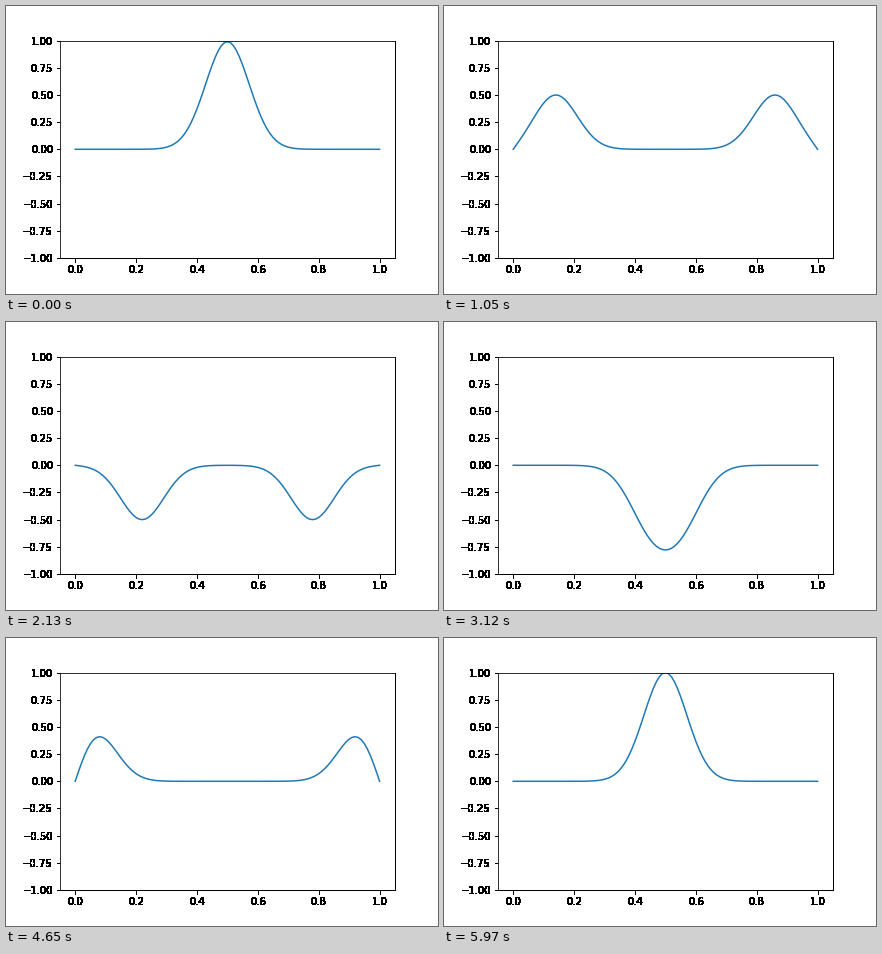
A matplotlib script that plays this animation: 432x288 px, repeating every 6000 ms.

```python
import numpy as np
import matplotlib.pyplot as plt
from matplotlib.animation import FuncAnimation

FRAMES = 200
INTERVAL = 30

plt.rcParams["font.family"] = "DejaVu Sans"
plt.rcParams["font.size"] = 10

x = np.linspace(0, 1, 101)


def pulse(s):
    """Gaussian bump at 0.5, extended oddly with period 2 (fixed ends)."""
    s = (s + 1) % 2 - 1
    return np.sign(s) * np.exp(-100 * (np.abs(s) - 0.5) ** 2)


def wave(travel):
    """Two half-height pulses running in opposite directions."""
    return (pulse(x - travel) + pulse(x + travel)) / 2


def bake_frame(fig):
    """Render the static axes once with hard black edges on the lettering."""
    fig.patch.set_alpha(0)
    fig.canvas.draw()
    rgba = np.array(fig.canvas.buffer_rgba()) / 255
    ink = np.zeros_like(rgba)
    ink[..., 3] = np.where(rgba[..., 3] > 0, 1 - rgba[..., 0], 0)
    fig.patch.set_alpha(1)
    return ink


fig = plt.figure(figsize=(6, 4), dpi=72, facecolor="white")
ax = fig.add_axes([0.125, 0.125, 0.775, 0.755])
ax.set_xlim(-0.05, 1.05)
ax.set_ylim(-1, 1)

ink = bake_frame(fig)
ax.set_axis_off()
fig.figimage(ink, origin="upper", zorder=5)

line, = ax.plot(x, wave(0.01), color="#1f77b4", lw=1.5)


def update(i):
    line.set_ydata(wave((i + 1) / 100))
    return line,


anim = FuncAnimation(fig, update, frames=FRAMES, interval=INTERVAL,
                     repeat=True, repeat_delay=0)
plt.show()
```
